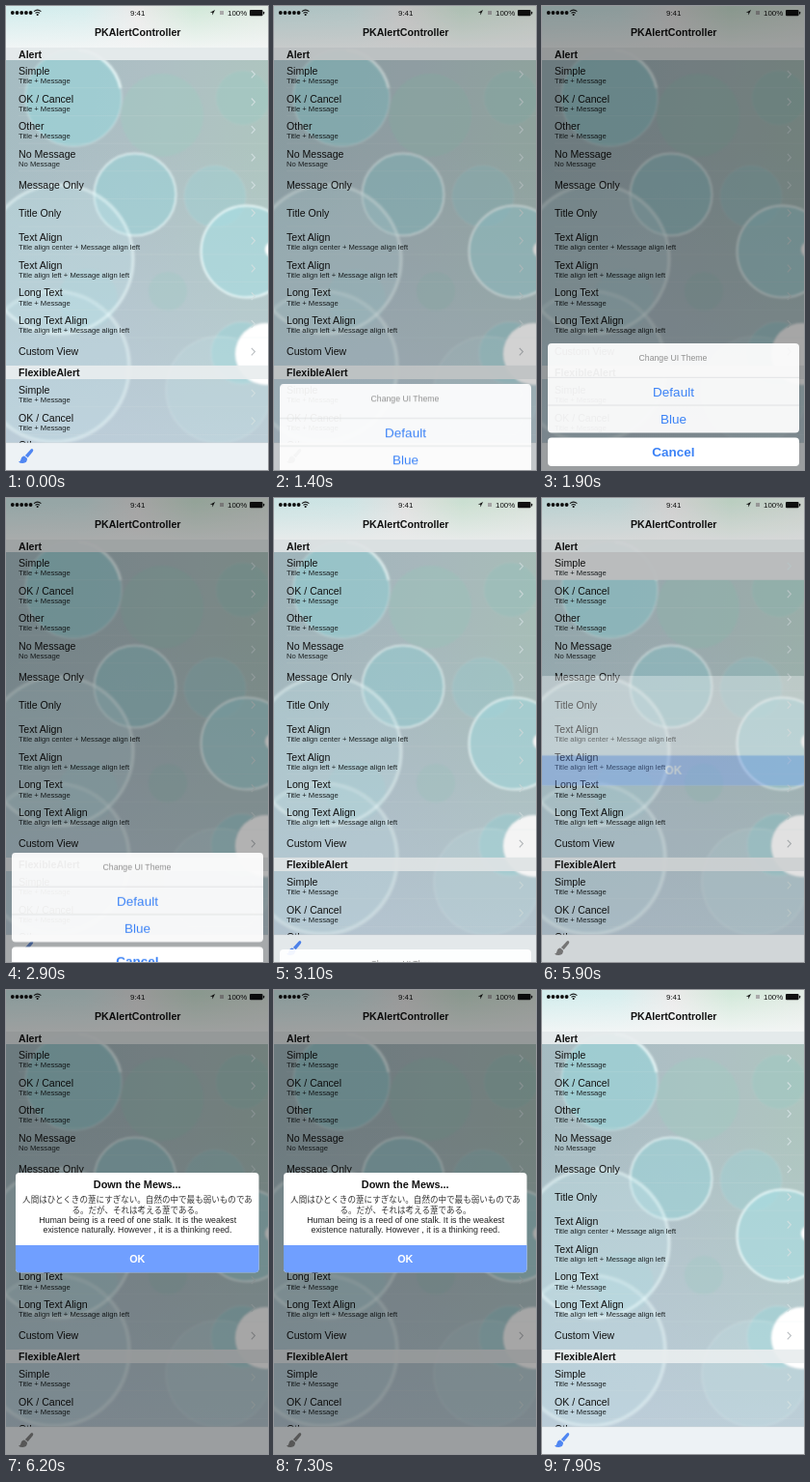
An HTML page that plays this animation: 272x480 px, repeating every 8 s.

```html
<!DOCTYPE html>
<html lang="en">
<head>
<meta charset="utf-8">
<title>Alert demo</title>
<style>
html, body { margin: 0; width: 100%; height: 100%; overflow: hidden; background: #fff; }
svg { display: block; width: 100vw; height: 100vh; }
text { font-family: "Liberation Sans", Arial, sans-serif; fill: #111; }
.bold { font-weight: 700; }
.title { font-size: 10.6px; }
.sub { font-size: 7.65px; fill: #1c2224; }
.status { font-size: 7.9px; }
.mid { text-anchor: middle; }
.msg { font-size: 8.85px; fill: #222; }
.ja { font-size: 8.55px; font-family: "Noto Sans CJK JP", "Noto Sans CJK", sans-serif; fill: #333; }
.action { font-size: 13.5px; fill: #3b82f6; }
.dim, .sheet, .alert, .words, .brush, .pick { animation: 8s linear infinite; }
.dim { animation-name: dim; }
.sheet { animation-name: sheet; }
.alert { animation-name: alert; transform-box: fill-box; transform-origin: center; }
.words { animation-name: words; }
.brush { animation-name: brush; }
.pick { animation-name: pick; }

@keyframes dim {
  0%, 15% { opacity: 0; animation-timing-function: ease-in-out; }
  20% { opacity: .35; }
  35% { opacity: .35; animation-timing-function: ease-in-out; }
  40%, 72.5% { opacity: 0; }
  76.25%, 92.5% { opacity: .35; }
  96.5%, 100% { opacity: 0; }
}
@keyframes sheet {
  0%, 15% { transform: translateY(135px); animation-timing-function: ease-out; }
  20% { transform: none; }
  35% { transform: none; animation-timing-function: ease-in-out; }
  40%, 100% { transform: translateY(135px); }
}
@keyframes alert {
  0%, 72.5% { opacity: 0; transform: scale(1.15); }
  76.25%, 92.5% { opacity: 1; transform: scale(1); }
  96.5%, 100% { opacity: 0; transform: scale(1); }
}
@keyframes words {
  0%, 73.8% { opacity: 0; }
  76.25%, 100% { opacity: 1; }
}
@keyframes brush {
  0%, 15% { color: #4f86f2; }
  17%, 35% { color: #858585; }
  37%, 72% { color: #4f86f2; }
  73.5%, 92.5% { color: #858585; }
  96%, 100% { color: #4f86f2; }
}
@keyframes pick {
  0%, 69.9% { opacity: 0; }
  70%, 73.75% { opacity: 1; }
  77%, 100% { opacity: 0; }
}
</style>
</head>
<body>
<svg viewBox="0 0 272 480" preserveAspectRatio="none">
  <defs>
    <linearGradient id="base" x2="1" y2=".25">
      <stop offset="0" stop-color="#a5bcc2"/>
      <stop offset=".55" stop-color="#aebfc4"/>
      <stop offset="1" stop-color="#aec5bf"/>
    </linearGradient>
    <linearGradient id="fade" x2="0" y2="1">
      <stop offset=".3" stop-color="#bfd0dd" stop-opacity="0"/>
      <stop offset="1" stop-color="#bfd0dd" stop-opacity=".9"/>
    </linearGradient>
    <linearGradient id="nav">
      <stop offset="0" stop-color="#d3eded"/>
      <stop offset=".3" stop-color="#d8eeee"/>
      <stop offset=".5" stop-color="#ebeaea"/>
      <stop offset=".72" stop-color="#d3e9da"/>
      <stop offset="1" stop-color="#e2ebe4"/>
    </linearGradient>
    <linearGradient id="shine" x2="0" y2="1">
      <stop offset=".1" stop-color="#f4f6f6" stop-opacity="0"/>
      <stop offset="1" stop-color="#f4f6f6" stop-opacity=".9"/>
    </linearGradient>
    <filter id="soft" x="-10%" y="-10%" width="120%" height="120%"><feGaussianBlur stdDeviation=".9"/></filter>
    <clipPath id="view"><rect y="43" width="272" height="409"/></clipPath>
  </defs>

  <rect width="272" height="480" fill="url(#base)"/>
  <rect width="272" height="480" fill="url(#fade)"/>
  <g id="bokeh" filter="url(#soft)"></g>

  <g id="list" clip-path="url(#view)">
    <rect class="pick" y="56" width="272" height="28.7" fill="#d4d6d7"/>
  </g>

  <rect width="272" height="43" fill="url(#nav)"/>
  <rect width="272" height="43" fill="url(#shine)"/>
  <text class="bold mid" x="136.7" y="31.3" font-size="10.6">PKAlertController</text>
  <g id="dots"></g>
  <g fill="none" stroke="#111" stroke-width="1.1">
    <path d="M29 5.6Q32.7 2.6 36.4 5.6M30.5 7.4Q32.7 5.6 34.9 7.4"/>
    <circle cx="32.7" cy="9" r=".5"/>
  </g>
  <text class="status mid" x="136.7" y="9.8">9:41</text>
  <path d="M217 4L211.8 6.8H214.3V9.4Z" fill="#111"/>
  <rect x="222" y="5" width="4" height="4" fill="#aaa"/>
  <text class="status" x="230" y="9.8">100%</text>
  <rect x="253" y="4" width="13.5" height="6.2" rx="1" fill="#111"/>
  <rect x="267" y="5.8" width="1.2" height="2.6" rx=".5" fill="#111"/>

  <rect y="452" width="272" height="28" fill="#edf2f5"/>
  <path d="M0 451.7H272" stroke="#cbd3d6" stroke-width=".5"/>
  <g class="brush" fill="currentColor">
    <path d="M27.6 458.2Q29 459.2 27.8 460.9L22.7 467.2L19.9 464.9L25.6 458.8Q26.6 457.7 27.6 458.2Z"/>
    <path d="M19.1 465.6L22 468Q22.2 472.8 17.4 473Q14.6 473.1 13 471.5Q15.2 471.2 15.6 468.7Q16.2 465.8 19.1 465.6Z"/>
  </g>

  <rect class="dim" width="272" height="480"/>

  <g class="sheet">
    <rect x="6" y="349" width="261" height="92.5" rx="4" fill="#fff" fill-opacity=".93"/>
    <path d="M6 384.3H267M6 413H267" stroke="#d0d3d5" stroke-width=".6"/>
    <text class="mid" x="136" y="367" font-size="8.7" style="fill:#8f8f8f">Change UI Theme</text>
    <text class="action mid" x="136.5" y="403.7">Default</text>
    <text class="action mid" x="136.5" y="432.3">Blue</text>
    <rect x="6" y="446.5" width="261" height="29.5" rx="4" fill="#fff"/>
    <text class="action bold mid" x="136.3" y="466">Cancel</text>
  </g>

  <g class="alert">
    <rect x="10" y="189" width="252.5" height="103.3" rx="4" fill="#fff"/>
    <path d="M10 264H262.5V288.3Q262.5 292.3 258.5 292.3H14Q10 292.3 10 288.3Z" fill="#709fff"/>
    <g class="words">
      <text class="bold mid" x="136.2" y="205" font-size="10.9">Down the Mews...</text>
      <text class="ja mid" x="136.5" y="220.3">人間はひとくきの葦にすぎない。自然の中で最も弱いものであ</text>
      <text class="ja mid" x="136.5" y="231">る。だが、それは考える葦である。</text>
      <text class="msg mid" x="136.7" y="241">Human being is a reed of one stalk. It is the weakest</text>
      <text class="msg mid" x="136.5" y="251.2">existence naturally. However , it is a thinking reed.</text>
    </g>
    <text class="bold mid" x="136.3" y="282" font-size="10.8" style="fill:#fff">OK</text>
  </g>
</svg>
<script>
const add = (parent, tag, attrs, text = "") => {
  const el = document.createElementNS("http://www.w3.org/2000/svg", tag);
  for (const key in attrs) el.setAttribute(key, attrs[key]);
  el.textContent = text;
  parent.append(el);
};
const byId = id => document.getElementById(id);

// x, y, radius, colour, fill opacity, rim opacity, rim width
const teal = "#9bd3d8", pale = "#c3e2e8", green = "#9fc9c2";
const bokeh = [
  [70, 95, 50, teal, .7, .25, 2], [162, 113, 43, green, .5, 0, 1], [246, 95, 28, green, .6, .06, 1],
  [217, 197, 32, teal, .4, .12, 1], [85, 303, 31, teal, .25, 0, 1], [168, 295, 20, green, .35, 0, 1],
  [245, 359, 32, teal, .55, .1, 2], [221, 397, 55, pale, .25, .12, 2], [50, 373, 78, pale, .3, .4, 4],
  [134, 195, 42.5, teal, .6, .65, 2], [55, 262, 77, pale, .38, .5, 3.5], [250, 254, 47.5, "#aadce0", .7, .85, 2]
];
for (const [cx, cy, r, fill, alpha, rim, width] of bokeh)
  add(byId("bokeh"), "circle", {
    cx, cy, r, fill, "fill-opacity": alpha,
    stroke: "#f2ffff", "stroke-opacity": rim, "stroke-width": width
  });
add(byId("bokeh"), "path", {
  d: "M76 45.5A50 50 0 0 1 119 85", fill: "none",
  stroke: "#f2ffff", "stroke-opacity": .7, "stroke-width": 3
});
add(byId("bokeh"), "circle", { cx: 277, cy: 252, r: 8, fill: "#fff" });
add(byId("bokeh"), "circle", { cx: 270, cy: 360, r: 32, fill: "#fff" });

for (let i = 0; i < 5; i++)
  add(byId("dots"), "circle", { cx: 6.8 + i * 4.7, cy: 7, r: 1.9, fill: "#111" });

const pitch = 28.7, list = byId("list");
const both = "Title + Message";
const simple = [["Simple", both], ["OK / Cancel", both], ["Other", both]];

function section(name, top, height, rows) {
  add(list, "rect", { y: top, width: 272, height, fill: "#e9edee", "fill-opacity": .93 });
  add(list, "text", { class: "title bold", x: 13, y: top + 10.9 }, name);
  rows.forEach(([title, sub], i) => {
    const y = top + height + i * pitch;
    add(list, "text", { class: "title", x: 13, y: y + (sub ? 14.8 : 18) }, title);
    if (sub) add(list, "text", { class: "sub", x: 13, y: y + 23.9 }, sub);
    add(list, "path", {
      d: `M254.8 ${y + 10.8}l3.6 3.8l-3.6 3.8`, fill: "none",
      stroke: title === "Custom View" ? "#b9bdc0" : "#d0dedf", "stroke-width": 1.1
    });
    add(list, "path", { d: `M13 ${y + pitch}H272`, stroke: "#d9e2e4", "stroke-opacity": .3, "stroke-width": .5 });
  });
}
section("Alert", 43, 13, [
  ...simple,
  ["No Message", "No Message"],
  ["Message Only"],
  ["Title Only"],
  ["Text Align", "Title align center + Message align left"],
  ["Text Align", "Title align left + Message align left"],
  ["Long Text", both],
  ["Long Text Align", "Title align left + Message align left"],
  ["Custom View"]
]);
section("FlexibleAlert", 372, 14, simple);
</script>
</body>
</html>
```
